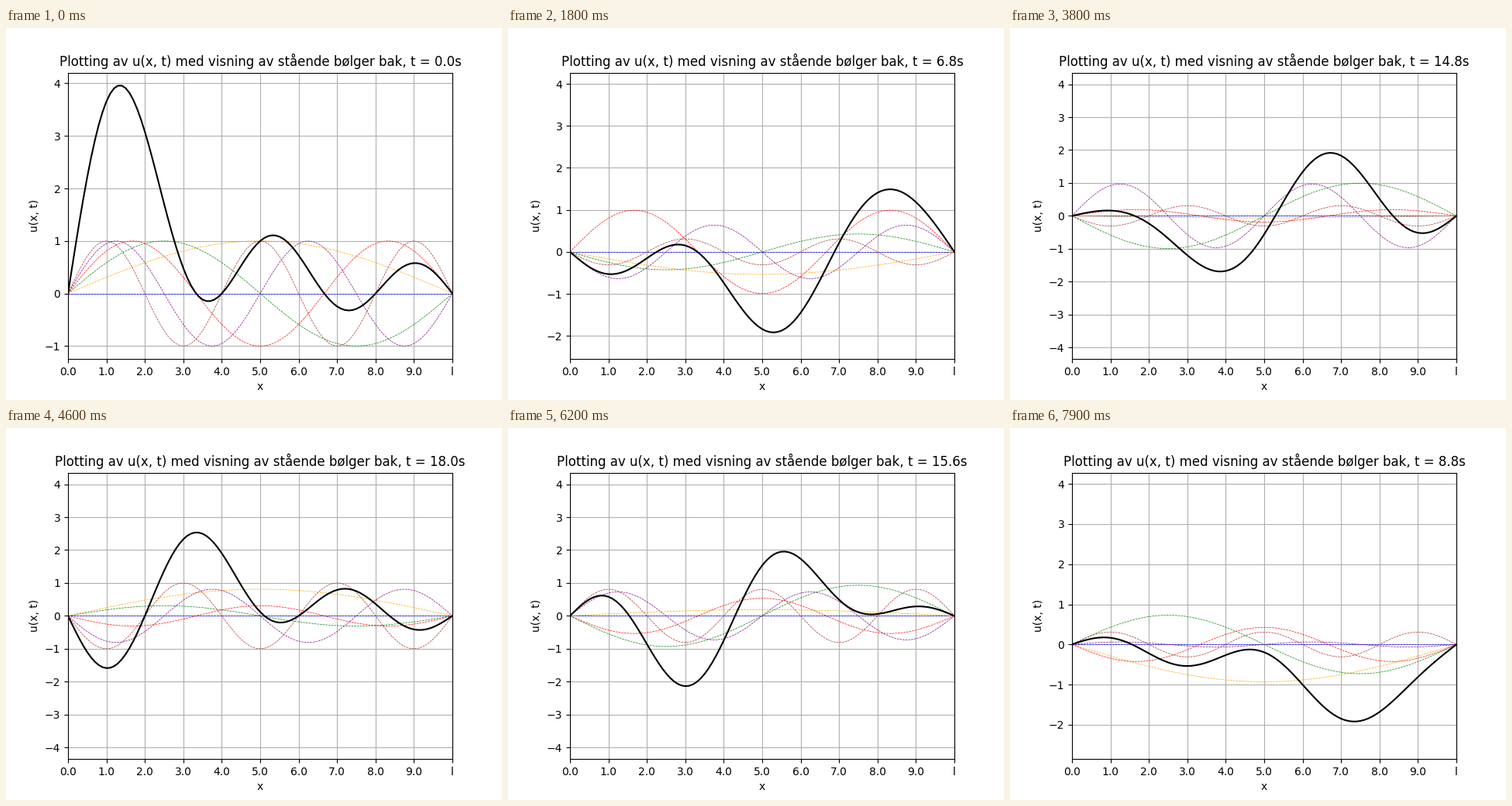
A matplotlib script that plays this animation: 640x480 px, repeating every 8 s.

```python
import numpy as np
import matplotlib.pyplot as plt
from matplotlib.animation import FuncAnimation

LENGTH = 10
SPEED = 1
DT = 0.4
T_MAX = 20
FRAMES = 80
COLORS = ["blue", "orange", "green", "red", "purple", "brown"]

x = np.linspace(0, LENGTH, 101)


def modes(t):
    """Standing waves n = 0..5 at time t, one per row."""
    k = np.arange(len(COLORS))[:, None] * np.pi / LENGTH
    return np.sin(k * x) * np.cos(k * SPEED * t)


def view_limits():
    """Y limits per time step; the view only ever grows to fit the curves."""
    lows, highs = [], []
    for i in range(round(T_MAX / DT) + 1):
        waves = modes(i * DT)
        curves = np.vstack([waves, waves.sum(axis=0)])
        lows.append(curves.min())
        highs.append(curves.max())
    low = np.minimum.accumulate(lows)
    high = np.maximum.accumulate(highs)
    margin = 0.05 * (high - low)
    return low - margin, high + margin


bottom, top = view_limits()
last = len(bottom) - 1

fig, ax = plt.subplots(figsize=(6.4, 4.8), dpi=100)
ax.set_xlim(0, LENGTH)
ax.set_xticks(range(LENGTH + 1), [f"{v:.1f}" for v in range(LENGTH)] + ["l"])
ax.set_xlabel("x")
ax.set_ylabel("u(x, t)")
ax.grid(True)
title = ax.set_title("")

wave_lines = [ax.plot(x, 0 * x, "--", color=c, lw=0.5)[0] for c in COLORS]
sum_line, = ax.plot(x, 0 * x, color="black", lw=1.5)


def update(frame):
    # The start is held for one extra frame; time turns back at T_MAX.
    step = max(frame - 1, 0)
    step = last - abs(last - step)
    t = step * DT
    waves = modes(t)
    for line, wave in zip(wave_lines, waves):
        line.set_ydata(wave)
    sum_line.set_ydata(waves.sum(axis=0))
    ax.set_ylim(bottom[step], top[step])
    title.set_text(
        f"Plotting av u(x, t) med visning av stående bølger bak, t = {t:.1f}s")
    return [*wave_lines, sum_line, title]


anim = FuncAnimation(fig, update, frames=FRAMES, interval=100,
                     init_func=lambda: update(0), repeat=True, repeat_delay=0)
plt.show()
```
